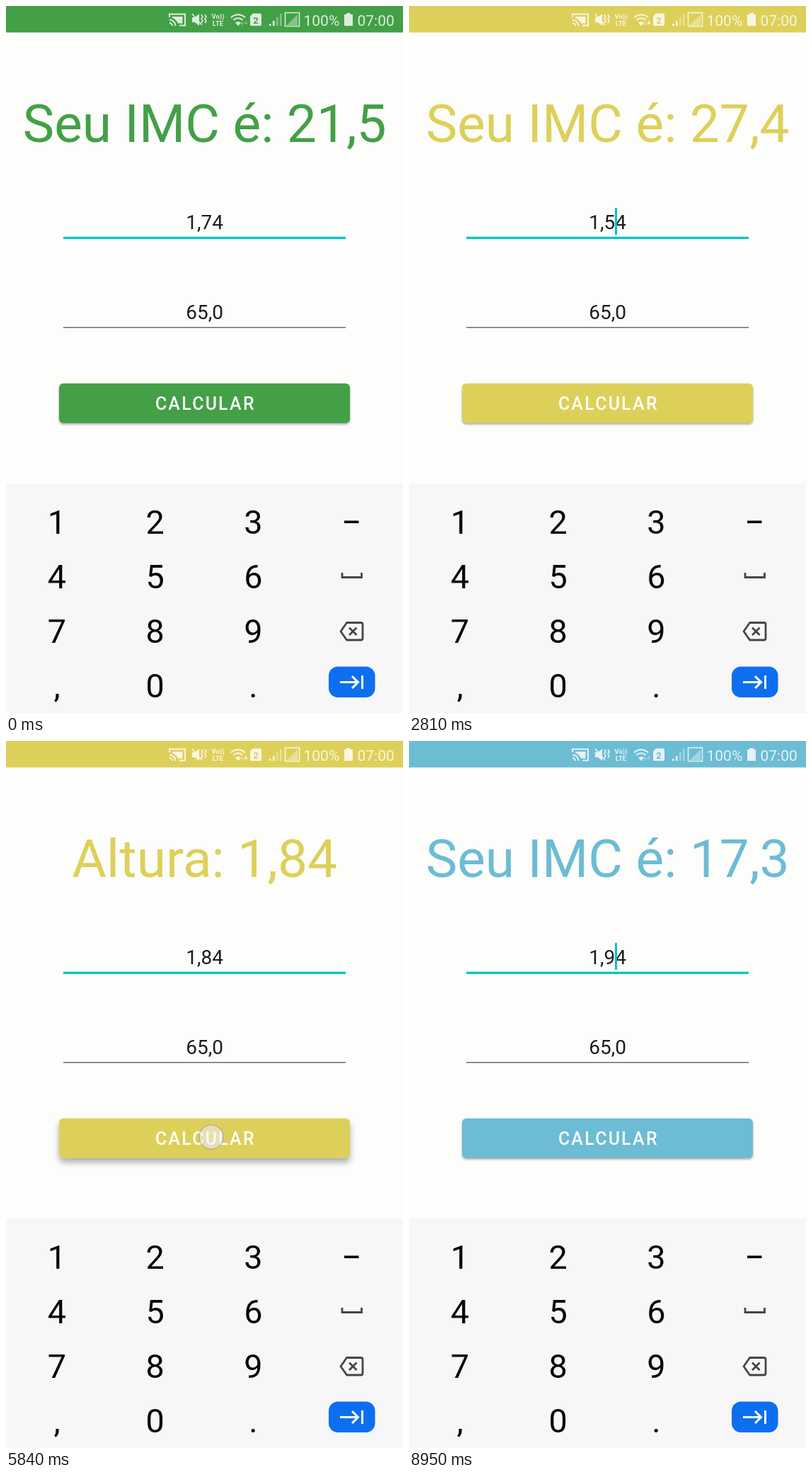
Recreate the animation shown at these times as an HTML page. Size 561x998 px, loop 9060 ms.

```html
<!DOCTYPE html>
<html lang="pt">
<head>
<meta charset="utf-8">
<title>IMC</title>
<style>
  html, body { margin: 0; width: 100%; height: 100%; overflow: hidden; background: #fdfdfc; }
  svg { display: block; width: 100vw; height: 100vh; font-family: Roboto, sans-serif; }
  .mid { text-anchor: middle; }
  .theme { fill: var(--theme); }
  #title { font-size: 74.8px; }
  .field { font-size: 28px; fill: #1c1c1c; }
  .label { font-size: 24.93px; font-weight: 500; letter-spacing: 2.23px; fill: #fff; }
  #keys { font-size: 46.75px; fill: #050505; }
  .line { fill: none; stroke: #444547; stroke-width: 2.8; }
  #status { fill: #fff; stroke: none; opacity: .82; }
  #status .stroke { fill: none; stroke: #fff; stroke-width: 2; }
  #status .faint { opacity: .45; }
  .clock { font-size: 21px; }
  .tiny { font-size: 9.5px; font-weight: 700; }
</style>
</head>
<body>
<svg id="stage" viewBox="0 0 561 998" preserveAspectRatio="none">
  <defs>
    <filter id="soft" x="-10%" y="-50%" width="120%" height="200%">
      <feGaussianBlur id="blur" stdDeviation="1.5"/>
    </filter>
  </defs>
  <rect width="561" height="998" fill="#fdfdfc"/>
  <rect class="theme" width="561" height="37.4"/>

  <g id="status">
    <path class="stroke" d="M231 16V11.5H253V27.5H245M231 19.5a8.5 8.5 0 0 1 8.5 8.5M231 24a4 4 0 0 1 4 4"/>
    <path d="M235 15H249.5V24.5H243Q240 18 235 17Z"/>
    <path d="M263 16h4l6-5v17l-6-5h-4z"/>
    <path class="stroke" style="stroke-width:1.6" d="M263 11L277 27M276 12l2 3-2 3 2 3-2 3M281 12l2 3-2 3 2 3-2 3"/>
    <text class="tiny mid" x="299.5" y="17.5">Vo))</text>
    <text class="tiny mid" x="299.5" y="27.5">LTE</text>
    <path class="stroke" d="M318 16.5a14 14 0 0 1 20 0M321.5 20a9 9 0 0 1 13 0"/>
    <path d="M324 23.5a6 6 0 0 1 8 0l-4 4.500z"/>
    <path id="down" d="M331 23h5l-2.5 5z"/>
    <path id="up" d="M336.5 25.5h5l-2.5-5z"/>
    <path d="M349 10.5h10a2 2 0 0 1 2 2v13.5a2 2 0 0 1-2 2h-12a2 2 0 0 1-2-2V14.5z"/>
    <text class="mid theme" x="353" y="24.5" font-size="13" font-weight="700">2</text>
    <path d="M372 25h2.5v3H372zM377 21h2.5v7H377z"/>
    <path class="faint" d="M382 16h2.5v12H382zM387 11h2.5v17H387z"/>
    <path class="stroke" style="stroke-width:1.5" d="M394.5 9.5h20v19h-20z"/>
    <path class="faint" d="M397 27L412 12V27z"/>
    <text class="clock" x="420.5" y="27.5">100%</text>
    <path d="M481 10h6v2h3v16h-12V12h3z"/>
    <text class="clock" x="496.5" y="27.5">07:00</text>
  </g>

  <text id="title" class="mid theme" x="280.7" y="192"></text>

  <text id="height" class="mid field" x="280.7" y="315"></text>
  <rect x="81" y="325.7" width="399" height="3.2" fill="#03c4c7"/>
  <rect id="cursor" y="285" width="3" height="38" fill="#03c4c7"/>
  <text class="mid field" x="280.7" y="442">65,0</text>
  <rect x="81" y="453" width="399" height="1.5" fill="#6b6b6f"/>

  <rect id="shadow" x="75" y="533" width="411" height="56" rx="6" filter="url(#soft)" fill-opacity=".32"/>
  <rect class="theme" x="75" y="532.8" width="411" height="56" rx="6"/>
  <text class="mid label" x="281.8" y="570">CALCULAR</text>

  <rect y="674" width="561" height="324" fill="#f7f7fa"/>
  <g id="keys" class="mid"></g>
  <rect x="478" y="726.5" width="20.5" height="3.6" fill="#050505"/>
  <path class="line" d="M475 800v6.5h27.5V800"/>
  <path class="line" d="M481.5 870.5H501.5a2.5 2.5 0 0 1 2.5 2.5v19.5a2.5 2.5 0 0 1-2.5 2.5H481.5L473 882.7zM485 877.5l10.5 10.5m0-10.5L485 888" stroke-linejoin="round"/>
  <rect x="456" y="932.5" width="65.5" height="43.5" rx="13" fill="#0d6ff0"/>
  <path class="line" style="stroke:#fff;stroke-width:3" d="M472 954.5H497M489 946l8.5 8.5-8.5 8.5M503.5 945v19"/>

  <circle id="touch" r="17" fill="rgba(240,240,250,.55)" stroke="rgba(140,140,185,.55)" stroke-width="1.5"/>
</svg>
<script>
const LOOP = 9060, BLINK = 495;
const GREEN = '#43a047', YELLOW = '#ddd05a', BLUE = '#6cbcd4';
const el = id => document.getElementById(id);
const clamp = v => Math.max(0, Math.min(1, v));

// time, height field, BMI result (null while typing), theme colour
const states = [
  [0, '1,74', '21,5', GREEN],
  [930, '1,4', null, GREEN],
  [1450, '1,54', null, GREEN],
  [2340, '1,54', '27,4', YELLOW],
  [3615, '1,4', null, YELLOW],
  [5040, '1,84', null, YELLOW],
  [5880, '1,84', '19,2', GREEN],
  [7290, '1,4', null, GREEN],
  [7650, '1,94', null, GREEN],
  [8350, '1,94', '17,3', BLUE]
];
// press, release, x, y
const taps = [
  [820, 930, 507, 888],
  [1350, 1450, 211, 806],
  [2170, 2340, 291, 555],
  [3480, 3600, 507, 888],
  [4980, 5050, 211, 884],
  [5690, 5880, 290, 559],
  [7190, 7290, 507, 888],
  [7560, 7650, 350, 884],
  [8175, 8350, 290, 557]
];
const edits = [40, ...states.filter(s => !s[2]).map(s => s[0])];
const upLit = [[1870, 2900], [3840, 4700], [5690, 6400], [8000, 8500]];
const downLit = [[6850, 7300], [8000, 8500]];

const latest = (list, t, time = v => v) => list.filter(v => time(v) <= t).pop();
const within = (spans, t) => spans.some(([a, b]) => t >= a && t < b);

['123', '456', '789', ',0.'].forEach((row, r) => [...row].forEach((char, c) => {
  const key = document.createElementNS('http://www.w3.org/2000/svg', 'text');
  key.setAttribute('x', 72 + c * 138.7);
  key.setAttribute('y', 744.8 + r * 77.2);
  key.textContent = char;
  el('keys').append(key);
}));

function drawTap(t) {
  const tap = latest(taps, t, v => v[0]);
  let shown = 0, lift = 0;
  if (tap) {
    const [press, release, x, y] = tap;
    shown = clamp((t - press + 20) / 60) * clamp((release + 250 - t) / 250);
    if (y < 600) lift = clamp((t - press) / 100) * clamp((release + 120 - t) / 130);
    el('touch').setAttribute('cx', x);
    el('touch').setAttribute('cy', y);
  }
  el('touch').setAttribute('opacity', shown);
  el('shadow').setAttribute('transform', `translate(0 ${1.8 + 4 * lift})`);
  el('blur').setAttribute('stdDeviation', 1.5 + 3.5 * lift);
}

function draw(t) {
  const [, height, result, color] = latest(states, t, v => v[0]);
  el('stage').style.setProperty('--theme', color);
  el('title').textContent = result ? `Seu IMC é: ${result}` : `Altura: ${height}`;
  el('height').textContent = height;

  const edit = latest(edits, t);
  const blinkOn = edit !== undefined && Math.floor((t - edit) / BLINK) % 2 === 0;
  el('cursor').setAttribute('x', height.length === 3 ? 283 : 291);
  el('cursor').setAttribute('opacity', blinkOn ? 1 : 0);

  el('up').setAttribute('opacity', within(upLit, t) ? 1 : 0.4);
  el('down').setAttribute('opacity', within(downLit, t) ? 1 : 0.4);
  drawTap(t);
}

const start = performance.now();
function tick() {
  draw((performance.now() - start) % LOOP);
  requestAnimationFrame(tick);
}
tick();
</script>
</body>
</html>
```
